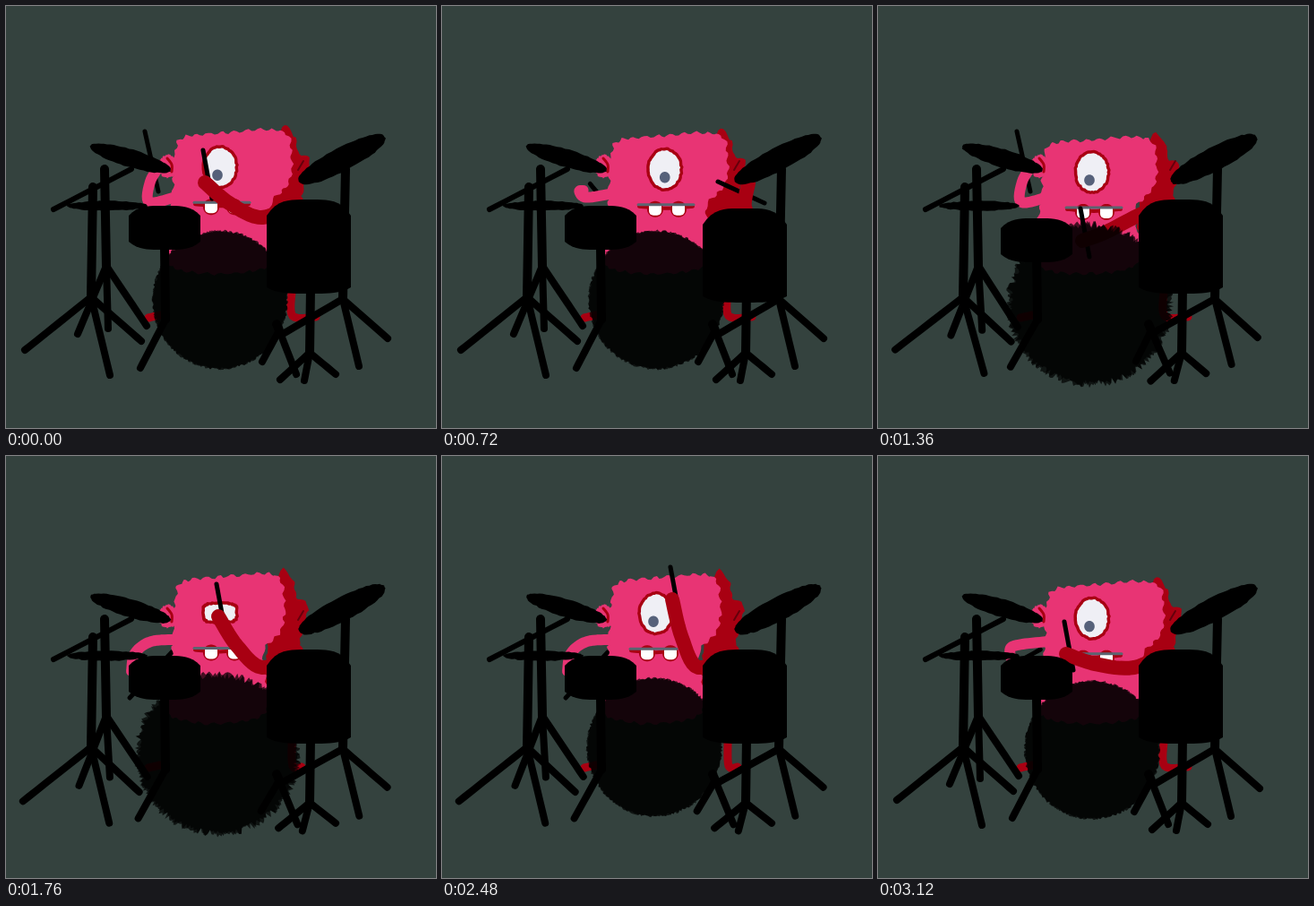
These frames come from a looping animation (480x471 px, 3160 ms). An HTML page with a canvas:

```html
<!DOCTYPE html>
<html lang="en">
<head>
<meta charset="utf-8">
<title>Drummer</title>
<style>
html, body { margin: 0; width: 100%; height: 100%; overflow: hidden; background: #34423e; }
canvas { display: block; width: 480px; height: 471px; }
</style>
</head>
<body>
<canvas id="stage" width="480" height="471"></canvas>
<script>
const g = document.getElementById('stage').getContext('2d');
const LOOP = 3160, STEP = 40, BAR = LOOP / 4, BEAT = BAR / 2;
const BG = '#34423e', PINK = '#e83474', RED = '#a80012', BLACK = '#000';
const TAU = 2 * Math.PI;

// Turning points: time, then value(s).
const RIGHT_HAND = [
  [0, 222, 197], [440, 296, 176], [720, 342, 198], [1080, 250, 165], [1360, 228, 262],
  [1760, 237, 179], [2150, 226, 258], [2480, 257, 160], [2950, 214, 246], [3120, 210, 221]
];
const LEFT_LIFT = [[0, 1], [440, 1], [720, 0.55], [1360, 1], [1760, 0], [2480, 0], [3120, 0.25]];

const LEFT_UP = { arm: [[172, 178], [161, 196], [160, 219], [190, 213]], stick: [[170, 207], [155, 140]] };
const LEFT_DOWN = { arm: [[140, 240], [144, 220], [162, 207], [190, 205]], stick: [[185, 219], [138, 270]] };

const BODY = [[189, 168], [197, 149], [240, 144], [308, 142], [319, 172], [315, 200], [295, 226], [294, 290], [183, 290], [186, 215]];
const BACK = [[306, 143], [323, 149], [326, 165], [339, 175], [330, 212], [320, 262], [292, 262]];

const mix = (a, b, u) => a + (b - a) * u;
const mixPoints = (a, b, u) => a.map((p, i) => [mix(p[0], b[i][0], u), mix(p[1], b[i][1], u)]);

function rng(seed) {
  seed = seed * 7919 + 101;
  return () => (seed = (seed * 16807 + 11) % 2147483647) / 2147483647;
}

// Looping interpolation with a soft ease.
function glide(keys, t) {
  let i = keys.length - 1;
  while (keys[i][0] > t) i--;
  const [start, ...a] = keys[i], [next, ...b] = keys[(i + 1) % keys.length];
  const u = (t - start) / ((next || LOOP) - start);
  return a.map((v, k) => mix(v, b[k], u * u * (3 - 2 * u)));
}

const pulse = (dt, rise, fall) => Math.max(0, dt < 0 ? 1 + dt / rise : 1 - dt / fall);

// Time from the nearest strike; `before` is how early the next one counts.
const since = (t, at, period, before) => (t - at + before + LOOP) % period - before;

function curve([a, b, c, d], u) {
  return [0, 1].map(k => b[k] + u / 2 * (c[k] - a[k] + u * (2 * a[k] - 5 * b[k] + 4 * c[k] - d[k] + u * (3 * (b[k] - c[k]) + d[k] - a[k]))));
}

function fill(points, color) {
  g.beginPath();
  points.forEach(p => g.lineTo(...p));
  g.closePath();
  g.fillStyle = color;
  g.fill();
}

// Closed smooth shape with a scalloped, slightly rough edge.
function fur(points, color, seed, wave) {
  const n = points.length, rand = rng(seed), out = [];
  let run = 0;
  for (let i = 0; i < n; i++) {
    const q = [-1, 0, 1, 2].map(k => points[(i + k + n) % n]);
    const dx = q[2][0] - q[1][0], dy = q[2][1] - q[1][1], len = Math.hypot(dx, dy);
    const steps = Math.ceil(len / 3);
    for (let s = 0; s < steps; s++) {
      const [x, y] = curve(q, s / steps);
      const off = (rand() - 0.5) * 1.6 + wave * Math.sin(run / 13 * TAU + seed);
      out.push([x + dy / len * off, y - dx / len * off]);
      run += len / steps;
    }
  }
  fill(out, color);
}

function limb(points, width, color = BLACK) {
  const at = i => points[Math.max(0, Math.min(points.length - 1, i))];
  g.beginPath();
  for (let i = 0; i < points.length - 1; i++) {
    const q = [at(i - 1), at(i), at(i + 1), at(i + 2)];
    for (let s = 0; s <= 8; s++) g.lineTo(...curve(q, s / 8));
  }
  g.strokeStyle = color;
  g.lineWidth = width;
  g.stroke();
}

// Ring of points; power below 1 squares it off, rough shakes it.
function ring(x, y, rx, ry, { power = 1, rough = 0, seed = 1, n = 64, tilt = 0 } = {}) {
  const rand = rng(seed), bend = v => Math.sign(v) * Math.abs(v) ** power;
  return Array.from({ length: n }, (_, i) => {
    const a = i / n * TAU, off = (rand() - 0.5) * 2 * rough;
    const u = bend(Math.cos(a)) * (rx + off), v = bend(Math.sin(a)) * (ry + off);
    return [x + u * Math.cos(tilt) - v * Math.sin(tilt), y + u * Math.sin(tilt) + v * Math.cos(tilt)];
  });
}

const oval = (x, y, rx, ry, color, opts) => fill(ring(x, y, rx, ry, opts), color);

function eye(x, y, look, shut, art) {
  const h = 24.5 - 12 * shut, opts = { power: 1 - shut / 2, rough: 0.6, seed: art };
  oval(x, y, 20.5, h, RED, opts);
  oval(x, y, 17, h - 3.5, '#efeff5', opts);
  if (shut < 0.5) oval(x + look, y + 9, 5.8, 6.2, '#56617a');
}

function mouth(x, y, w) {
  limb([[x + 1, y + 2], [x + w / 2, y + 4], [x + w - 1, y + 2]], 4, RED);
  for (const dx of [19, 45]) {
    oval(x + dx, y + 5, 9, 9, RED);
    g.fillStyle = '#fff';
    g.beginPath();
    g.roundRect(x + dx - 7, y, 14, 12, [1, 1, 5, 5]);
    g.fill();
  }
  limb([[x, y], [x + w, y]], 3, '#5b6470');
}

function leftArm(t, glance) {
  const [lift] = glide(LEFT_LIFT, t);
  const [butt, tip] = mixPoints(LEFT_DOWN.stick, LEFT_UP.stick, lift);
  limb([butt, [tip[0] + 24 * glance, tip[1]]], 5);
  limb(mixPoints(LEFT_DOWN.arm, LEFT_UP.arm, lift), 12, PINK);
}

function rightArm(t) {
  const [x, y] = glide(RIGHT_HAND, t);
  const elbow = [286 + Math.max(0, x - 257) * 0.65, 236];
  const wrist = [(x + elbow[0]) / 2 - 4, (y + elbow[1]) / 2 + 4];
  const reach = Math.max(0, Math.min(1, (x - 300) / 40));
  const [butt, tip] = mixPoints([[x + 8, y + 18], [x - 2, y - 36]], [[x + 18, y + 22], [x - 34, y - 2]], reach);
  limb([butt, tip], 5);
  limb([[x, y], wrist, elbow, [324, 218]], 16, RED);
}

function monster(t, art) {
  const bob = pulse(since(t, 590, BAR, 150), 150, 330);
  const glance = Math.max(0, 1 - ((t - 520) / 400) ** 2);
  const eyeY = 175 + 12 * bob, squash = (167 - 17 * bob) / 158;
  const lean = art ? -8 : 0, sag = art === 2 ? -4 : 0;
  const pose = (points, right, left) => points.map(([x, y]) => [x + (x > 250 ? right : left), 300 - (300 - y) * squash]);

  limb([[319, 318], [320, 346], [art === 1 ? 330 : 346, 347]], 9, RED);
  limb([[159, 348], [172, 345]], 9, RED);

  leftArm(t, glance);
  oval(181, 179, 11, 13, PINK, { rough: 1 });
  fur(pose(BACK, lean / 4, 0), RED, art + 4, 0.8);
  fur(pose(BODY, lean, sag), PINK, art + 1, 1.5);
  limb([[180, 170], [185, 177], [185, 185]], 3, RED);
  limb([[326, 183], [332, 173]], 2, '#64000c');

  eye(239 + 13 * glance, eyeY, 4 * glance - 3, pulse(t - 1760, 90, 90), art);
  mouth(210 + 12 * glance, eyeY + 39.5, art === 1 ? 52 : 62);
  rightArm(t);
}

// Pole with legs fanning from a hub; each drawing shakes the feet.
function stand(top, hub, feet, art) {
  const rand = rng(art + top[0]), shake = () => art ? (rand() - 0.5) * 5 : 0;
  limb([top, hub], 10);
  for (const [x, y] of feet) limb([hub, [x + shake(), y + shake()]], 8);
}

// Flat sides with arched top and bottom.
function barrel(x, w, top, bottom, arch, belly) {
  const span = Array.from({ length: 21 }, (_, i) => i / 10 - 1);
  const edge = (y, bow) => span.map(u => [x + u * w, y + bow * u ** 4]);
  fill([...edge(top, arch), ...edge(bottom, -belly).reverse()], BLACK);
}

function bass(hit, art, seed) {
  const rest = art === 1 ? 1 - hit : 0;
  for (const layer of [0, 1]) {
    g.globalAlpha = 0.7;
    oval(239 - 3 * hit - 2 * rest, 328 + 5 * hit - 3 * rest, 75 + 15 * hit, 77 + 12 * hit, BLACK,
      { rough: 1.5 + 3 * hit, seed: seed * 2 + layer, n: 260 });
  }
  g.globalAlpha = 1;
}

function kit(t, art, seed) {
  const kick = pulse(since(t, 175, BEAT, BEAT / 2), 65, 140);
  const snare = t > BAR ? 14 * pulse(since(t, 570, BAR, 60), 60, 110) : 0;
  const tom = 11 * pulse(t - 700, 320, 200);
  const rough = { rough: 0.6, seed: art + 1 };

  stand([97, 202], [95, 325], [[21, 384], [116, 412], [151, 374]], art);
  stand([110, 182], [112, 290], [[114, 360], [157, 357], [80, 366]], art);
  stand([379, 182], [376, 327], [[394, 402], [426, 371], [309, 366]], art);
  stand([340, 315], [339, 387], [[306, 417], [368, 411], [333, 418]], art);
  stand([177, 268], [178, 350], [[150, 404]], art);
  stand([302, 355], [305, 362], [[324, 411], [286, 397]], art);
  limb([[140, 182], [53, 227]], 6);

  oval(113, 223, 45, 5.5, BLACK, rough);
  oval(139, 170, 47, 10, BLACK, { ...rough, tilt: 0.29 });
  oval(375, 171, 54, 13, BLACK, { ...rough, tilt: -0.48, power: 0.9 });
  barrel(177, 40, 223 + snare, 272 + snare, 11, 9);
  barrel(338, 47, 216 + tom, 321 + tom, 18, 7);
  bass(kick, art, seed);
}

function draw(now) {
  const frame = Math.floor(now / STEP), held = Math.floor((frame + 1) / 2), art = held % 3;
  g.fillStyle = BG;
  g.fillRect(0, 0, 480, 471);
  g.lineCap = g.lineJoin = 'round';
  monster(frame * STEP, art);
  kit(frame * STEP, art, held);
}

function tick(now) {
  draw(now % LOOP);
  requestAnimationFrame(tick);
}
draw(0);
requestAnimationFrame(tick);
</script>
</body>
</html>
```
